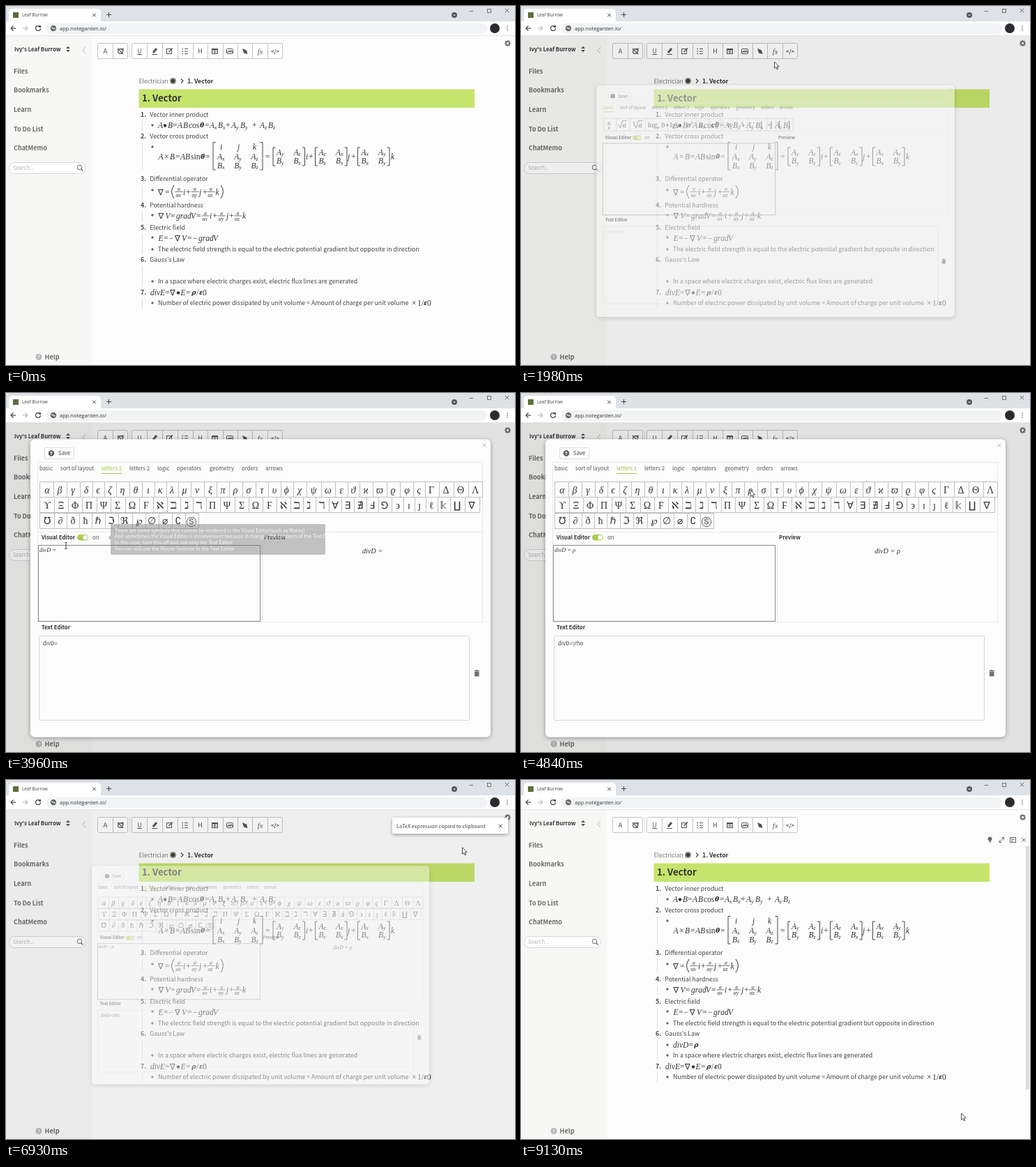
An HTML page with a canvas that plays this animation: 730x515 px, repeating every 9240 ms.

```html
<!DOCTYPE html>
<html lang="en">
<head>
<meta charset="utf-8">
<title>Leaf Burrow</title>
<style>
html, body { margin: 0; width: 100%; height: 100%; overflow: hidden; background: #fcfcfc; }
canvas { display: block; width: 730px; height: 515px; }
</style>
</head>
<body>
<canvas id="stage"></canvas>
<script>
const W = 730, H = 515, STEP = 110, FRAMES = 84;
const SANS = '"Noto Sans CJK KR", "Noto Sans CJK JP", "Noto Sans CJK", "Open Sans", sans-serif';
const UI = '"Open Sans", sans-serif';
const SERIF = '"Liberation Serif", "DejaVu Sans", serif';
const OBLIQUE = '"DejaVu Sans", sans-serif';
const GREEN = '#a3c644';

const canvas = document.getElementById('stage');
const c = canvas.getContext('2d');
const dpr = window.devicePixelRatio || 1;
canvas.width = W * dpr;
canvas.height = H * dpr;

// ---------- basic helpers ----------
function text(s, x, y, size, color = '#444', { w = 400, f = SANS, align = 'left', style = '' } = {}) {
  c.font = `${style} ${w} ${size}px ${f}`;
  c.fillStyle = color;
  c.textAlign = align;
  c.fillText(s, x, y + size * 0.36);
  return c.measureText(s).width;
}
function rect(x, y, w, h, color) {
  c.fillStyle = color;
  c.fillRect(x, y, w, h);
}
function line(pts, color = '#555', lw = 1) {
  c.beginPath();
  pts.forEach(([x, y], i) => i ? c.lineTo(x, y) : c.moveTo(x, y));
  c.strokeStyle = color;
  c.lineWidth = lw;
  c.stroke();
}
function box(x, y, w, h, color = '#ccc', lw = 1) {
  c.strokeStyle = color;
  c.lineWidth = lw;
  c.strokeRect(x + 0.5, y + 0.5, w, h);
}
function round(x, y, w, h, r, fill, stroke) {
  c.beginPath();
  c.roundRect(x, y, w, h, r);
  if (fill) { c.fillStyle = fill; c.fill(); }
  if (stroke) { c.strokeStyle = stroke; c.lineWidth = 1; c.stroke(); }
}
function disc(x, y, r, fill, stroke, lw = 1) {
  c.beginPath();
  c.arc(x, y, r, 0, 7);
  if (fill) { c.fillStyle = fill; c.fill(); }
  if (stroke) { c.strokeStyle = stroke; c.lineWidth = lw; c.stroke(); }
}
function cross(x, y, r, color, lw = 1) {
  line([[x - r, y - r], [x + r, y + r]], color, lw);
  line([[x - r, y + r], [x + r, y - r]], color, lw);
}
// The shadow is clipped to the outside, so a half transparent card stays bright
function card(x, y, w, h, r, fill, blur, alpha) {
  c.save();
  c.beginPath();
  c.rect(-W, -H, 3 * W, 3 * H);
  c.roundRect(x, y, w, h, r);
  c.clip('evenodd');
  c.shadowColor = `rgba(0,0,0,${alpha})`;
  c.shadowBlur = blur * dpr;
  c.shadowOffsetY = 1.5 * dpr;
  round(x, y, w, h, r, fill);
  c.restore();
  round(x, y, w, h, r, fill);
}

// ---------- formulas ----------
// "_x" is a subscript, quoted parts are upright
function math(s, x, y, size = 11.5, color = '#333') {
  for (const [, sub, word, ch] of s.matchAll(/_(.)|'([^']*)'|(.)/gu)) {
    if (sub) x += text(sub, x, y + 3, size * 0.68, color, { f: SERIF, style: 'italic' });
    else if (word) x += text(word, x, y, size, color, { f: SERIF });
    else if (ch === '●') { disc(x + 3, y + 0.5, 2.2, color); x += 6.5; }
    else if (/[θρε]/.test(ch)) x += text(ch, x, y, size * 0.8, color, { f: OBLIQUE, style: 'italic', w: 700 });
    else x += text(ch, x, y, size, color, { f: SERIF, style: /[A-Za-zα]/.test(ch) ? 'italic' : '' });
  }
}
function row(y, list) {
  const p = list.split(' ');
  for (let i = 0; i < p.length; i += 2) math(p[i + 1], +p[i], y);
}
function frac(x, y, v) {
  math('α', x - 2, y - 4, 7.5);
  line([[x - 5.5, y], [x + 5.5, y]], '#444', 0.7);
  math('α' + v, x - 4.5, y + 4.5, 7.5);
}
function brackets(x1, x2, y1, y2) {
  for (const [x, d] of [[x1, 3.5], [x2, -3.5]])
    line([[x + d, y1], [x, y1], [x, y2], [x + d, y2]], '#333', 0.9);
}
function matrix2(x, top, bottom) {
  brackets(x, x + 45.5, 203, 229);
  [[top, 209.5], [bottom, 222]].forEach(([name, y]) =>
    [0, 1].forEach(i => math(name[0] + '_' + name[i + 1], x + 5 + i * 24.5, y)));
}
function paren(x, bend) {
  c.beginPath();
  c.moveTo(x, 257);
  c.quadraticCurveTo(x + bend, 266.5, x, 276);
  c.strokeStyle = '#333';
  c.lineWidth = 1;
  c.stroke();
}

// ---------- browser frame ----------
function browser() {
  rect(0, 0, W, 43, '#fff');
  rect(0, 0, W, 22, '#dee1e6');
  round(4, 4, 132, 22, 5, '#fff');
  rect(10, 9, 8, 8, '#5c6f3c');
  text('Leaf Burrow', 23, 12.5, 6.5, '#444', { f: UI });
  cross(126.5, 13, 2.3, '#444');
  line([[144, 12.5], [151, 12.5]], '#444');
  line([[147.5, 9], [147.5, 16]], '#444');
  disc(643, 13, 4, '#55585c');
  line([[641.3, 12.2], [643, 14], [644.7, 12.2]], '#fff', 0.9);
  line([[664.5, 7.5], [670, 7.5]], '#555', 0.8);
  box(690, 4, 5, 5, '#555', 0.8);
  cross(718.5, 6.5, 2.7, '#444', 0.8);

  round(57, 25, 633, 15, 7.5, '#f1f3f4');
  line([[14, 32], [7, 32]], '#444', 1.2);
  line([[10.5, 28.5], [7, 32], [10.5, 35.5]], '#444', 1.2);
  line([[24, 32], [31, 32]], '#bbb', 1.2);
  line([[27.5, 28.5], [31, 32], [27.5, 35.5]], '#bbb', 1.2);
  c.beginPath();
  c.arc(46, 32, 3.4, 0, 5.4);
  c.strokeStyle = '#444';
  c.lineWidth = 1.2;
  c.stroke();
  rect(47.2, 28, 2.8, 2.8, '#444');
  disc(68, 32, 3.6, '#777', '#444');
  line([[65, 31], [71, 33]], '#fff', 1);
  text('app.notegarden.io/', 77, 32, 7.5, '#333', { f: UI });
  disc(701, 32, 7, '#2c2b30');
  [29, 32, 35].forEach(y => disc(719, y, 0.8, '#555'));
  rect(0, 42, W, 1, '#e2e3e4');
}

// ---------- page ----------
function gear(x, y) {
  for (let i = 0; i < 8; i++) {
    const a = i * Math.PI / 4, u = Math.cos(a), v = Math.sin(a);
    line([[x + u * 2.6, y + v * 2.6], [x + u * 4.4, y + v * 4.4]], '#666', 1.6);
  }
  disc(x, y, 2.5, null, '#666', 1.4);
}
function sidebar() {
  rect(0, 43, 123, H - 43, '#f7f8f6');
  text("Ivy's Leaf Burrow", 12, 62, 7.85, '#333', { w: 700 });
  for (const d of [-1, 1]) {
    c.beginPath();
    c.moveTo(86, 62 + d); c.lineTo(92, 62 + d); c.lineTo(89, 62 + d * 4.2);
    c.fillStyle = '#555';
    c.fill();
  }
  line([[114, 59], [110, 63.5], [114, 68]], '#aaa', 0.9);
  ['Files', 'Bookmarks', 'Learn', 'To Do List', 'ChatMemo'].forEach((s, i) =>
    text(s, 11, 93.6 + i * 27.6, 9, '#6a6b69', { w: 700 }));
  round(4.5, 224.5, 110, 16, 8, '#fff', '#d5d5d5');
  text('Search...', 10, 232.5, 7.5, '#b5b5b5');
  disc(105.5, 231.5, 3.3, null, '#666');
  line([[108, 234], [110.5, 236.5]], '#666', 1.2);
  disc(47, 503.5, 4.5, '#b8b8b8');
  text('?', 47, 503.5, 6.5, '#fff', { w: 700, align: 'center' });
  text('Help', 55.5, 503.2, 9.2, '#6a6b69', { w: 700 });
}
function toolbar() {
  const ink = '#555', edge = '#c4c4c4';
  round(131.5, 53.5, 43, 22, 2, '#fff', edge);
  round(180.5, 53.5, 216, 22, 2, '#fff', edge);
  rect(177, 54, 1, 22, '#e0e0e0');
  [153, 202, 224, 246, 268, 289, 311, 332, 353, 375].forEach(x => rect(x, 54, 1, 21, edge));
  const glyph = (s, x, size = 9.5, o = {}) => text(s, x, 65, size, ink, { align: 'center', ...o });
  glyph('A', 142.5);
  disc(164, 65, 3.4, null, ink, 1.2);
  line([[160, 61], [168, 69]], ink, 1.2);
  line([[164, 62], [168, 61], [168, 64.5]], ink, 1.2);
  glyph('U', 191.5, 8.5);
  line([[188, 69.5], [195, 69.5]], ink);
  line([[211, 67], [216, 61]], ink, 3);
  line([[209, 69.5], [217, 69.5]], ink);
  box(230, 61, 7, 7, ink);
  line([[233.5, 66], [239, 60.5]], ink, 1.4);
  [61.5, 65, 68.5].forEach(y => {
    line([[256, y], [261, y]], ink);
    line([[252.5, y], [254, y]], ink, 1.4);
  });
  glyph('H', 278.5);
  box(295, 61, 8, 7, ink);
  rect(295, 61, 9, 2.5, ink);
  line([[295, 66], [304, 66]], ink, 0.8);
  line([[299.5, 62], [299.5, 69]], ink, 0.8);
  round(316.5, 61.5, 9, 7, 1, null, ink);
  line([[317.5, 67], [320, 64.5], [321.5, 66], [323, 64], [325, 67]], ink, 1.3);
  c.beginPath();
  c.moveTo(339, 61); c.lineTo(345, 63.5); c.lineTo(346.5, 69); c.lineTo(341, 67.5); c.closePath();
  c.fillStyle = ink;
  c.fill();
  glyph('fx', 364.5, 10.5, { f: SERIF, style: 'italic' });
  glyph('</>', 386, 7.5, { w: 700 });
}
function hoverTools() {
  const ink = '#6a6a6a';
  disc(672.5, 84.5, 3, ink);
  rect(672, 85, 1.6, 5, ink);
  line([[686, 89.5], [692.5, 82.5]], ink);
  line([[689.5, 82.5], [692.5, 82.5], [692.5, 85.5]], ink);
  line([[686, 86.5], [686, 89.5], [689, 89.5]], ink);
  box(701, 82, 8, 7, ink);
  line([[704, 82], [704, 89]], ink);
  line([[705, 85.5], [708, 85.5]], ink);
  cross(721, 86, 2.6, ink);
  rect(724, 95, 5, 349, '#dcdcdc');
}
function note(pasted) {
  text('Electrician', 190.5, 107.5, 8.6, '#777');
  for (let i = 0; i < 5; i++) {
    const a = i * Math.PI / 5, u = Math.cos(a) * 4.6, v = Math.sin(a) * 4.6;
    line([[239.5 - u, 107.5 - v], [239.5 + u, 107.5 + v]], '#34402a', 1.3);
  }
  disc(239.5, 107.5, 2.4, '#34402a');
  line([[251, 104.5], [254, 107.5], [251, 110.5]], '#444', 1.2);
  text('1. Vector', 260, 107.5, 8.7, '#333', { w: 700 });
  rect(190.5, 119.5, 481.5, 26.5, '#c5e46b');
  text('1. Vector', 195, 132, 13.2, '#333', { w: 700 });

  const items = ['Vector inner product', 'Vector cross product', 'Differential operator',
    'Potential hardness', 'Electric field', "Gauss's Law", ''];
  const tops = [156, 187, 248, 286, 318, 364, 411], ends = [179, 236, 277, 309, 356, 402, 434];
  items.forEach((s, i) => {
    text(i + 1 + '.', 193, tops[i], 8.8, '#444', { w: 700 });
    text(s, 206.3, tops[i], 8.8);
    rect(195, tops[i] + 9, 1, ends[i] - tops[i] - 9, '#dfdfdf');
  });
  [171, 202, 264, 300, 332, 349, 395, 426].forEach(y => disc(210, y, 1.7, '#666'));

  row(171, "218 A 225 ● 232 B 239 = 246 A 254 B 262 'cos' 278 θ 285 = 292 A_x 304 B_x 315 + 323 A_y 336 B_y 353 + 364 A_z 376 B_z");

  row(216, "218.5 A 227 × 235 B 243 = 250 A 257 B 265 'sin' 279 θ 286 =");
  brackets(297, 368, 195.5, 235);
  row(202, '307 i 332 j 354 k');
  ['A', 'B'].forEach((n, r) => ['x', 'y', 'z'].forEach((v, i) =>
    math(n + '_' + v, 303 + i * 24.3, 216 + r * 12.5)));
  row(216, '372 = 430 i 434 + 490 j 495 + 552 k');
  matrix2(383, 'Ayz', 'Byz');
  matrix2(443.5, 'Azx', 'Bzx');
  matrix2(504.5, 'Axy', 'Bxy');

  row(266.5, '218 ∇ 228 = 254 i 258 + 277 j 282 + 300.5 k');
  paren(241, -7);
  paren(308, 7);
  row(301, '218.5 ∇ 228.5 V 236 = 244 grad 265 V 273 = 292 i 296.5 + 316 j 320 + 339 k');
  ['x', 'y', 'z'].forEach((v, i) => {
    frac(248 + i * 23, 266.5, v);
    frac(286 + i * 23.3, 301, v);
  });
  row(333, '218.5 E 226 = 233.5 − 242 ∇ 252 V 260 = 268 − 276 grad 297 V');
  text('The electric field strength is equal to the electric potential gradient but opposite in direction', 218, 349, 8.8);
  if (pasted) {
    disc(210, 380, 1.7, '#666');
    row(380, '218 divD 240.5 = 248 ρ');
  }
  text('In a space where electric charges exist, electric flux lines are generated', 218, 395, 8.8);
  row(411, '207 divE 228 = 235 ∇ 244 ● 250.5 E 258 = 266 ρ 273 / 277 ε 282 0');
  text('Number of electric power dissipated by unit volume = Amount of charge per unit volume', 218, 426, 8.8);
  row(426, '582 × 590 1 596 / 599 ε 604 0');
}

// ---------- formula dialog ----------
const CELL = '#c0c0c0';
const TABS = [['basic', 48], ['sort of layout', 78], ['letters 1', 137], ['letters 2', 177], ['logic', 217],
  ['operators', 245], ['geometry', 292], ['orders', 338], ['arrows', 372]];
const SYMBOLS = [
  ['αβγδϵζηθικλμνξπρστυϕχψωεϑϰϖϱφςΓΔΘΛ', 683,
    '59 77 96 115 132 149 167 186 204 221 238 256 274 293 311 329 348 367 385 402 421 441 462 481 498 516 536 555 575 592 610 631 652 673'],
  ['ϒΞΦΠΨΣΩϜℵℶℷℸΠΨΣΩϜℵℶℷℸ∀∃∄Ⅎ⅁϶ıȷℓ𝕜∐∇', 679,
    '59 79 99 119 140 160 181 201 221 240 259 277 296 317 338 358 378 398 417 434 453 472 490 508 525 543 562 578 593 610 627 647 668'],
  ['℧∂ðħℏℑℜ℘∅⌀∁Ⓢ', 276, '59 78 96 114 132 151 170 191 209 228 247 266']
];
function symbolRows() {
  SYMBOLS.forEach(([chars, end, list], r) => {
    const y = 127 + r * 22.3, xs = list.split(' ').map(Number);
    box(48, Math.round(y), end - 48, 22, CELL);
    [...chars].forEach((s, i) => {
      if (i) rect(Math.round((xs[i] + xs[i - 1]) / 2), y, 1, 22, CELL);
      const italic = r === 0 && i < 30 ? 'italic' : '';
      text(s, xs[i], y + 11.5, 14, '#333', { f: SERIF, align: 'center', style: italic });
    });
  });
}
function basicRow() {
  const it = { f: SERIF, style: 'italic', align: 'center' }, up = { f: SERIF, align: 'center' };
  box(48, 127, 216, 23, CELL);
  box(268, 127, 129, 23, CELL);
  [71, 96, 125, 166, 197, 219, 242, 294, 313, 332, 349, 365, 381].forEach(x => rect(x, 127, 1, 23, CELL));
  text('a', 58, 134, 9, '#333', it);
  line([[54.5, 139], [61.5, 139]], '#333', 0.8);
  text('b', 58, 144, 9, '#333', it);
  for (const x of [74, 103]) {
    line([[x, 140], [x + 2, 139], [x + 5, 145], [x + 9, 132], [x + 17, 132]], '#333', 0.9);
    text('a', x + 12.5, 139, 14, '#333', it);
  }
  text('n', 104, 135, 7, '#333', it);
  text('log', 138, 139, 13.5, '#333', up);
  text('a', 149, 143, 8.5, '#333', it);
  text('b', 158, 139, 14, '#333', it);
  text('lg', 176, 139, 13.5, '#333', up);
  text('a', 187.5, 139, 14, '#333', it);
  for (const [x, s, d] of [[205, 'ab', -4], [227, 'ab', 4], [250, 'cb', -4], [250, 'ca', 4]]) {
    text(s[0], x, 139, 14, '#333', it);
    text(s[1], x + 6.5, 139 + d, 8.5, '#333', it);
  }
  [...'∞∴∵⌊⌋⌈⌉'].forEach((s, i) =>
    text(s, [281, 303, 322, 340, 356, 373, 389][i], 139, 15, '#333', up));
}
function trash(x, y) {
  const ink = '#707070';
  rect(x - 3, y - 2.5, 6.5, 7, ink);
  rect(x - 3.5, y - 4, 7.5, 1, ink);
  rect(x - 1.2, y - 5, 2.6, 1, ink);
}
function dialog(s) {
  const dy = s.letters ? 44 : 0, top = 173 + dy + (s.letters ? 1 : 0);
  const bottom = s.letters ? 328 : 306, low = s.letters ? 22 : 0, faint = '#e9e9e9';
  card(35, 66.5, 660, 427, 6, '#fcfcfc', 6, 0.35);
  cross(686, 75, 2.5, '#aebf9d', 0.9);
  round(55.5, 78.5, 42, 16, 2, null, '#dcdcdc');
  disc(65, 86.5, 4.2, '#555');
  line([[65, 89], [65, 84.5]], '#fff');
  line([[63.2, 86.2], [65, 84.2], [66.8, 86.2]], '#fff');
  text('Save', 75, 86.5, 7.8, '#444');

  box(45, 99, 638, bottom - 99, faint);
  rect(45, 155 + dy, 638, 1, faint);
  TABS.forEach(([name, x], i) => {
    const on = i === (s.letters ? 2 : 0);
    const w = text(name, x, 108, 7.8, on ? GREEN : '#555', { w: on ? 500 : 400 });
    if (on) rect(x, 115, w, 1, GREEN);
  });
  if (s.letters) symbolRows(); else basicRow();

  text('Visual Editor', 51, 163 + dy, 7.75, '#333', { w: 700 });
  round(102, 159 + dy, 16, 8.5, 4.25, s.muted ? '#a3b27f' : '#aacb52');
  disc(113.7, 163.2 + dy, 3.3, '#fff');
  text('on', 124, 163 + dy, 7.8, '#555');
  text('Preview', 370, 163 + dy, 7.75, '#333', { w: 700 });
  rect(367, top, 1, bottom - top, faint);
  if (s.focus) box(45.5, top + 0.5, 319, bottom - top - 1, '#5a9bd0', 1.8);
  else box(46, top, 318, bottom - top - 1, '#8a8a8a');

  const it = { f: SERIF, style: 'italic' };
  const shown = s.typed.replace('=', ' =') + (s.rho ? ' ρ' : '');
  text(shown, 48, top + 6.5, 8.4, '#333', it);
  text(shown, 525.5, top + 8, 10.2, '#333', { ...it, align: 'center' });

  text('Text Editor', 51, 314 + low, 7.75, '#333', { w: 700 });
  if (s.trashHover) rect(667, 331, 17, 141, '#efefef');
  round(47.5, 326.5 + low, 617, 143 - low, 1, null, '#d6d6d6');
  if (s.typed) text(s.typed + (s.rho ? '\\rho' : ''), 53, 337 + low, 7.8, '#444');
  else text('Enter text', 52, 337 + low, 7.8, '#ccc');
  trash(675, 391 + low * 0.5);
}
function tooltip(alpha) {
  c.globalAlpha = alpha;
  round(150, 188, 308, 44, 2, '#777');
  c.beginPath();
  c.moveTo(150, 204); c.lineTo(146.5, 207.5); c.lineTo(150, 211);
  c.fill();
  c.globalAlpha = Math.min(1, alpha * 2);
  ['There are some symbols that cannot be rendered in the Visual Editor(such as Matrix)',
    'And sometimes the Visual Editor is inconvenient because it changes the contents of the Text Editor',
    'In this case, turn this off and use only the Text Editor',
    'You can still use the Mouse Selector in the Text Editor'
  ].forEach((s, i) => text(s, 156, 197 + i * 8.8, 7, '#fff'));
  c.globalAlpha = 1;
}
function toast(alpha) {
  c.globalAlpha = alpha;
  card(554, 54, 166, 23, 2, '#fff', 5, 0.35);
  text('LaTeX expression copied to clipboard', 560, 66, 7.4, '#444');
  cross(709, 66, 2.4, '#555');
  c.globalAlpha = 1;
}

// ---------- pointer ----------
const PATH = [[1, 610, 450], [7, 262, 372], [11, 262, 372], [16, 363.5, 80], [19, 363.5, 80], [22, 140, 230],
  [25, 140, 230], [28, 138.5, 160.5], [31, 148, 107], [32, 148, 107], [36, 86, 219], [41, 329, 139], [44, 329, 139],
  [51, 679, 406], [56, 679, 406], [60, 686, 75], [62, 686, 75], [68, 261.5, 370], [78, 261.5, 370],
  [82, 508, 393], [83, 631.5, 478]];
function pointerAt(n) {
  const i = PATH.findIndex(p => p[0] >= n);
  const b = PATH[i], a = PATH[Math.max(0, i - 1)];
  const u = b === a ? 1 : (n - a[0]) / (b[0] - a[0]), e = u * u * (3 - 2 * u);
  return [a[1] + (b[1] - a[1]) * e, a[2] + (b[2] - a[2]) * e];
}
function outline(pts) {
  c.beginPath();
  pts.forEach(([x, y]) => c.lineTo(x, y));
  c.closePath();
  c.fillStyle = '#fff';
  c.fill();
  c.strokeStyle = '#222';
  c.lineWidth = 0.8;
  c.stroke();
}
function pointer(kind, x, y) {
  c.save();
  c.translate(x, y);
  if (kind === 'beam') {
    line([[0, -4], [0, 4]], '#222', 0.9);
    line([[-1.8, -4.5], [1.8, -4.5]], '#222', 0.7);
    line([[-1.8, 4.5], [1.8, 4.5]], '#222', 0.7);
  } else if (kind === 'hand') {
    outline([[-1, 0], [0.7, 0], [1, 4.5], [5, 5.5], [5.8, 7], [5, 12.5], [-0.5, 12.5], [-4, 8], [-3, 6.8], [-1, 8.3]]);
  } else {
    outline([[0, 0], [0, 9.5], [2.2, 7.5], [3.8, 11], [5.2, 10.3], [3.7, 7], [6.6, 6.8]]);
  }
  c.restore();
}

// ---------- timeline ----------
const OPENING = { 17: 0.1, 18: 0.5, 19: 0.88, 62: 0.8, 63: 0.4, 64: 0.1 };
function openness(n) {
  return OPENING[n] ?? (n > 19 && n < 62 ? 1 : 0);
}
function draw(n) {
  const open = openness(n), letters = n >= 32;
  const [x, y] = pointerAt(n);
  const onPage = n > 0 && !open && x > 123 && y > 92;
  const state = {
    letters,
    typed: 'divD='.slice(0, Math.max(0, n - 22)),
    rho: n >= 42,
    focus: n >= 22 && n < 32,
    muted: n >= 27 && n <= 29,
    trashHover: n < 60 && x > 667 && y > 331
  };

  c.setTransform(dpr, 0, 0, dpr, 0, 0);
  rect(0, 0, W, H, '#fcfcfc');
  browser();
  sidebar();
  toolbar();
  gear(719.5, 53.5);
  note(n >= 74);
  if (onPage) {
    hoverTools();
    if (y > 357 && y < 388 && x < 400) line([[178, 366.5], [181, 363], [184, 366.5]], '#555', 1.2);
  }
  if (open) {
    rect(0, 43, W, H - 43, `rgba(0,0,0,${0.1 * Math.min(1, open * 1.3)})`);
    c.save();
    if (open < 1) {
      const k = 0.556 + 0.444 * open;
      c.globalAlpha = open;
      c.translate(365, 279.5);
      c.scale(k, k);
      c.translate(-365, -279.5);
    }
    dialog(state);
    c.restore();
  }
  const tip = { 34: 0.6, 35: 0.9, 36: 0.45, 37: 0.12 }[n];
  if (tip) tooltip(tip);
  if (n >= 52 && n <= 70) toast(n === 52 || n === 70 ? 0.5 : 1);

  if (!n) return;
  const inEditor = open === 1 && x > 46 && x < 365 && y > (letters ? 217 : 173) && y < 306;
  const inRow = onPage && x < 300 && y > 355 && y < 390;
  pointer(inEditor || inRow ? 'beam' : state.trashHover ? 'hand' : 'arrow', x, y);
}

let last = -1;
function tick() {
  const n = Math.floor(performance.now() / STEP) % FRAMES;
  if (n !== last) draw(last = n);
  requestAnimationFrame(tick);
}
tick();
</script>
</body>
</html>
```
